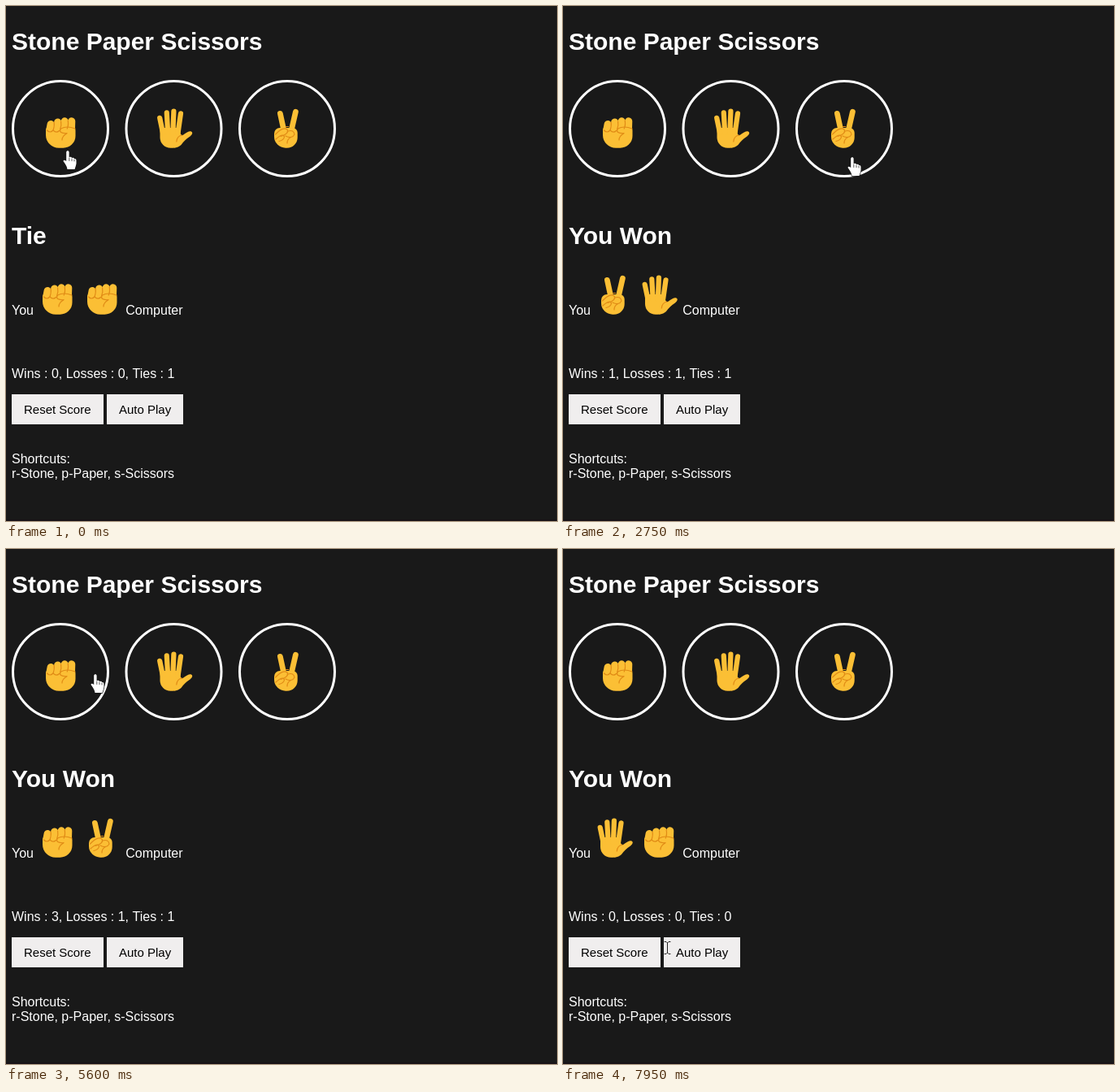
Write an HTML page with a canvas that moves like this. It is 678 px wide and 634 px high and loops after 8 s.

```html
<!DOCTYPE html>
<html lang="en">
<head>
<meta charset="utf-8">
<title>Stone Paper Scissors</title>
<style>
html, body { margin: 0; width: 100%; height: 100%; overflow: hidden; background: #191919; }
canvas { display: block; }
</style>
</head>
<body>
<canvas id="stage" width="678" height="634"></canvas>
<script>
const ctx = document.getElementById('stage').getContext('2d');
const LOOP = 8000, STEP = 50, RESET = 7350;
const BACK = '#191919', SKIN = '#fbbf35', CREASE = '#e08b16';
const FONT = '"Liberation Sans", Arial, sans-serif';
const CIRCLE_Y = 151, RADIUS = 60;
const circleX = i => 67 + 139.5 * i;

// time, player's hand, computer's hand
const CLICKS = [
  [0, 'stone', 'stone'],
  [1100, 'paper', 'scissors'],
  [2400, 'scissors', 'paper'],
  [4300, 'stone', 'scissors'],
  [5100, 'stone', 'scissors'],
  [5900, 'paper', 'stone']
];
const BEATS = { stone: 'scissors', paper: 'stone', scissors: 'paper' };

// Pointer moves: start, end, destination, optional vertical bow
const ORIGIN = [76, 178];
const MOVES = [
  [300, 850, 182, 179],
  [1350, 1900, 431, 233],
  [1900, 2250, 363, 180, 12],
  [2650, 3150, 296, 238],
  [3250, 3450, 179, 233],
  [3450, 3900, 55, 189],
  [5400, 5850, 188, 163, -25],
  [6300, 7150, 115, 490],
  [7450, 7650, 137, 491],
  [7750, 7950, 128, 491]
];

const fill = (d, color) => { ctx.fillStyle = color; ctx.fill(new Path2D(d)); };

function stroke(d, color, width) {
  ctx.strokeStyle = color;
  ctx.lineWidth = width;
  ctx.lineCap = ctx.lineJoin = 'round';
  ctx.stroke(new Path2D(d));
}

const finger = (x0, y0, x1, y1, width) => stroke(`M${x0} ${y0}L${x1} ${y1}`, SKIN, width);
const crease = d => stroke(d, CREASE, 1.2);

function palm(x, y, w, h, corners) {
  ctx.fillStyle = SKIN;
  ctx.beginPath();
  ctx.roundRect(x, y, w, h, corners);
  ctx.fill();
}

function text(str, x, y, size = 16, color = '#fff', weight = 'normal') {
  ctx.font = `${weight} ${size}px ${FONT}`;
  ctx.fillStyle = color;
  ctx.fillText(str, x, y);
}

// Hands are drawn around the centre of their circle.
const HANDS = {
  stone() {
    palm(-18, -3, 36.5, 26.7, [5, 5, 15, 16]);
    for (let i = 0; i < 4; i++) {
      finger(-13.4 + 8.9 * i, 3, -11.8 + 8.5 * i, -9.2 + 0.6 * (2.5 - i) ** 2, 9.2);
    }
    for (let i = 0; i < 3; i++) {
      const x = -8 + 8.6 * i;
      crease(`M${x} ${-8 - i}Q${x + 1} -4 ${x - 1} ${2 - i}`);
    }
    crease('M-16.5 2Q-13 6 -9 2Q-5 6 -1.5 2.5');
    crease('M18 0Q8 -4 .5 0C-2 4 1 6 8 5.7Q2 9 2 14');
  },
  paper() {
    palm(-17, -1, 25, 24.7, [4, 3, 9, 13]);
    for (let i = 0; i < 4; i++) {
      finger(-13.5 + 6.2 * i, 5, -17.3 + 8.6 * i, -21.4 + 2.3 * (i - 1.9) ** 2, 6.2);
    }
    fill('M7 4Q9 9 11 8Q18 2.5 21 3.3Q25 5 20 9.5Q13 14 9 20Q6 23 0 23.7Z', SKIN);
    crease('M10 8Q4 9 3.3 16');
  },
  scissors() {
    palm(-16, -1, 28.7, 24.7, [7, 6, 13, 14]);
    finger(-8.6, -18.6, -3.5, 5, 6.8);
    finger(10.4, -20.8, 4.5, 5, 6.8);
    crease('M-1.5 -2.5H1.5M-14.5 7Q-5 -3 0 1Q3 6 -8 9.5');
    crease('M-14 13Q-5 5 -3.5 10Q-4 14 -10 15.5');
    crease('M1 3Q8 1 9 7Q6 13 -2 9M4 11Q0 13 0 18');
  }
};

const POINTERS = {
  hand() {
    const d = 'M-1.8 2C-1.8 -.5 1.6 -.5 1.6 2V8Q4.5 7 5 9Q7.5 8 8 10Q10.5 9.5 10.5 12V16Q10 19 8.5 23H-.5Q-1 19 -5.5 13Q-5 10.5 -1.8 13Z';
    stroke(d, BACK, 1.4);
    fill(d, '#fff');
    stroke('M1.8 9V12.5M5 10V12.7M8 11V13', '#333', 0.8);
  },
  arrow() {
    const d = 'M.5 .5V15.5L4 12.2L6.5 17.6L8.8 16.6L6.4 11.4H11Z';
    stroke(d, '#111', 1.2);
    fill(d, '#fff');
  },
  beam() {
    stroke('M-3 -7.5H-1L.5 -6L2 -7.5H4M.5 -6V6M-3 7.5H-1L.5 6L2 7.5H4', '#222', 1);
  }
};

function place(draw, x, y) {
  ctx.save();
  ctx.translate(x, y);
  draw();
  ctx.restore();
}

function pointerAt(t) {
  let [x, y] = ORIGIN;
  for (const [from, to, toX, toY, bow = 0] of MOVES) {
    const u = Math.min(1, Math.max(0, (t - from) / (to - from)));
    const ease = u * u * (3 - 2 * u);
    x += (toX - x) * ease;
    y += (toY - y) * ease + bow * Math.sin(Math.PI * u);
  }
  return [x, y];
}

function drawPointer(t) {
  const [x, y] = pointerAt(t);
  const inside = [0, 1, 2].some(i => Math.hypot(x - circleX(i), y - CIRCLE_Y) < RADIUS);
  const kind = t >= 7600 ? 'beam' : inside ? 'hand' : 'arrow';
  place(POINTERS[kind], Math.round(x), Math.round(y));
}

function gameAt(t) {
  const score = { wins: 0, losses: 0, ties: 0 };
  const game = { score };
  for (const [time, you, computer] of CLICKS) {
    if (time > t) break;
    const outcome = you === computer ? 'ties' : BEATS[you] === computer ? 'wins' : 'losses';
    score[outcome]++;
    Object.assign(game, { you, computer, outcome });
  }
  if (t >= RESET) score.wins = score.losses = score.ties = 0;
  return game;
}

function button(label, x, width) {
  ctx.fillStyle = '#f0eeee';
  ctx.fillRect(x, 478, width, 37);
  text(label, x + 15, 502, 15, '#000');
}

function draw(t) {
  const { you, computer, outcome, score } = gameAt(t);
  const result = { wins: 'You Won', losses: 'You Lost', ties: 'Tie' }[outcome];
  ctx.fillStyle = BACK;
  ctx.fillRect(0, 0, 678, 634);
  ctx.fillStyle = '#171216';
  ctx.fillRect(0, 632, 678, 2);

  text('Stone Paper Scissors', 7, 54, 30, '#fff', 'bold');
  Object.values(HANDS).forEach((hand, i) => {
    ctx.strokeStyle = '#fff';
    ctx.lineWidth = 3;
    ctx.beginPath();
    ctx.arc(circleX(i), CIRCLE_Y, RADIUS - 1.5, 0, Math.PI * 2);
    ctx.stroke();
    place(hand, circleX(i), CIRCLE_Y);
  });

  text(result, 7, 293, 30, '#fff', 'bold');
  text('You', 7, 380);
  place(HANDS[you], 63, 356);
  place(HANDS[computer], 118, 356);
  text('Computer', 147.3, 380);
  text(`Wins : ${score.wins}, Losses : ${score.losses}, Ties : ${score.ties}`, 7, 458);
  button('Reset Score', 7, 113);
  button('Auto Play', 124, 94);
  text('Shortcuts:', 7, 563);
  text('r-Stone, p-Paper, s-Scissors', 7, 581);
  drawPointer(t);
}

const start = performance.now();
function tick() {
  const t = (performance.now() - start) % LOOP;
  draw(Math.floor(t / STEP) * STEP);
  requestAnimationFrame(tick);
}
tick();
</script>
</body>
</html>
```
